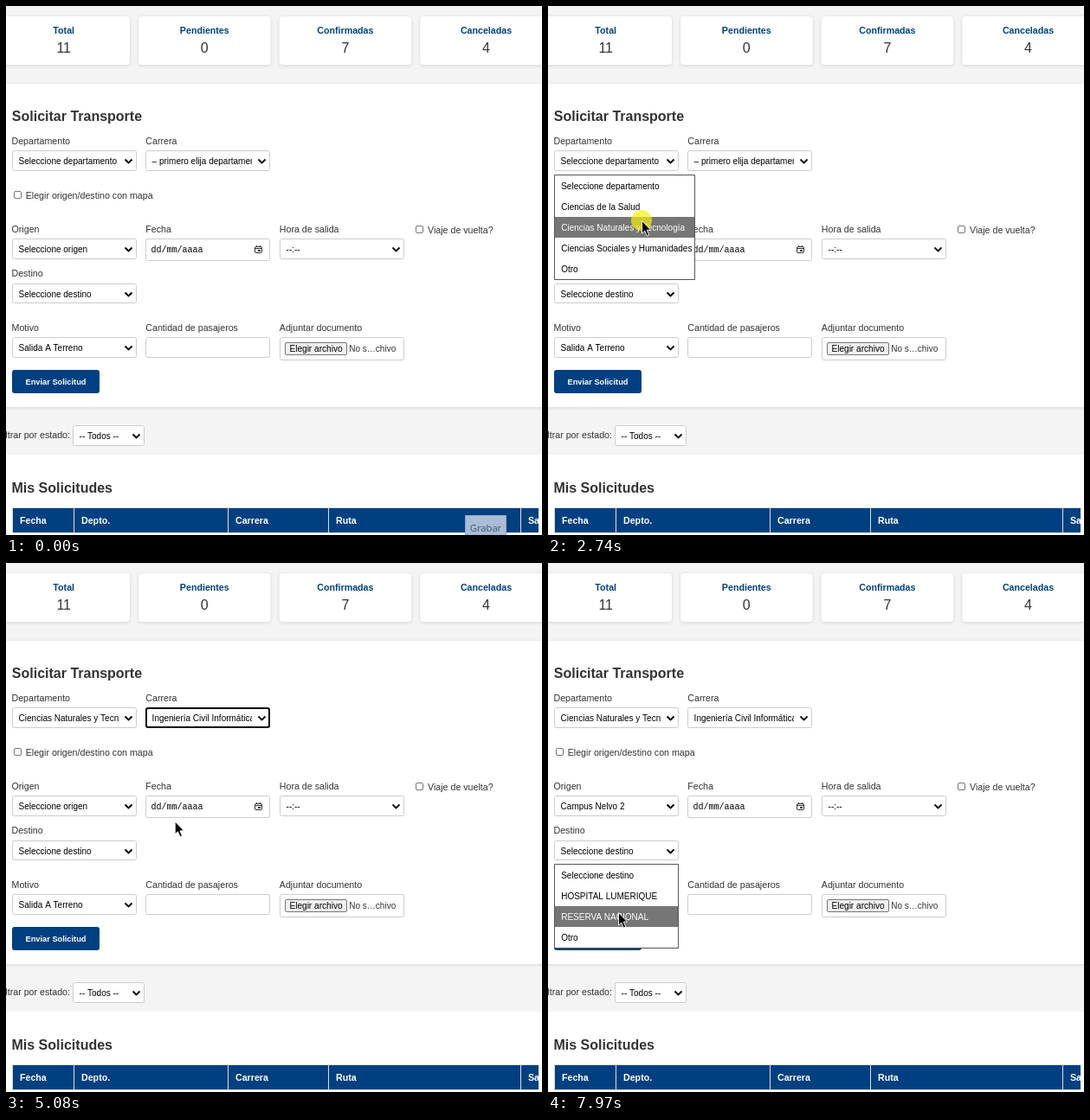
Recreate the animation shown at these times as an HTML page with a canvas. Size 619x612 px, loop 8000 ms.

```html
<!DOCTYPE html>
<html lang="es">
<head>
<meta charset="utf-8">
<title>Solicitar Transporte</title>
<style>
html, body { margin: 0; width: 100%; height: 100%; overflow: hidden; background: #fff; }
canvas { display: block; width: 619px; height: 612px; }
</style>
</head>
<body>
<canvas id="stage" width="619" height="612"></canvas>
<script>
const LOOP = 8000, ROW = 24;
const NAVY = '#004080', INK = '#333', PAGE = '#f4f4f4';
const ctx = document.getElementById('stage').getContext('2d');

// Pointer keys: time, x, y
const PATH = [
  [0, 505, 625], [30, 505, 625], [270, 454, 586], [510, 454, 586], [1130, 92, 225],
  [1320, 125, 194], [1350, 125, 194], [1480, 112, 180], [1830, 112, 180], [2460, 108, 248],
  [2830, 108, 248], [3380, 236, 178], [3580, 236, 178], [4280, 228, 306], [4770, 228, 306],
  [5570, 129, 284], [5970, 129, 284], [6450, 101, 334], [7320, 101, 334], [7970, 81, 404]
];

// press: pointer highlight starts; open/close: option list; pick: chosen option; blur: focus ring ends
const MENUS = [
  { x: 7, y: 167, h: 24, width: 163, press: 1730, open: 1790, choose: 2740, close: 2800, blur: 3420, pick: 2,
    options: ['Seleccione departamento', 'Ciencias de la Salud', 'Ciencias Naturales y Tecnología',
      'Ciencias Sociales y Humanidades', 'Otro'] },
  { x: 161, y: 167, h: 24, width: 144, press: 3420, open: 3480, choose: 4460, close: 4550, blur: 5600, pick: 4,
    options: ['Seleccione carrera', 'Agronomía', 'Ingeniería Forestal', 'Ingeniería Civil Industrial',
      'Ingeniería Civil Informática', 'Otro'],
    before: '– primero elija departamento –', ready: 2800 },
  { x: 7, y: 269, h: 24, width: 144, press: 5600, open: 5650, choose: 6610, close: 6680, blur: 7050, pick: 1,
    options: ['Seleccione origen', 'Campus Nelvo 2', 'LUMERIQUE', 'Otro'] },
  { x: 7, y: 321, h: 23, width: 144, press: 7050, open: 7075, choose: LOOP, close: LOOP, blur: LOOP, pick: 2,
    options: ['Seleccione destino', 'HOSPITAL LUMERIQUE', 'RESERVA NACIONAL', 'Otro'] }
];

const within = (t, from, to) => t >= from && t < to;

function pointerAt(t) {
  const next = PATH.findIndex(key => key[0] > t);
  if (next < 0) return PATH[PATH.length - 1].slice(1);
  const [t0, x0, y0] = PATH[next - 1], [t1, x1, y1] = PATH[next];
  const u = (t - t0) / (t1 - t0), k = u * u * (3 - 2 * u);
  return [x0 + (x1 - x0) * k, y0 + (y1 - y0) * k];
}

function rect(x, y, w, h, color) {
  ctx.fillStyle = color;
  ctx.fillRect(x, y, w, h);
}

function text(str, x, y, { size = 10.67, color = INK, bold = false, align = 'left', family = '"Liberation Sans", Arial, sans-serif' } = {}) {
  ctx.font = `${bold ? 'bold ' : ''}${size}px ${family}`;
  ctx.fillStyle = color;
  ctx.textAlign = align;
  ctx.fillText(str, x, y);
}

function frame(x, y, w, h, { border = '#ccc', fill = '#fff', radius = 2, line = 1 } = {}) {
  ctx.beginPath();
  ctx.roundRect(x + line / 2, y + line / 2, w - line, h - line, radius);
  ctx.fillStyle = fill;
  ctx.fill();
  ctx.strokeStyle = border;
  ctx.lineWidth = line;
  ctx.stroke();
}

function polyline(points, color, width) {
  ctx.beginPath();
  points.forEach(([x, y]) => ctx.lineTo(x, y));
  ctx.strokeStyle = color;
  ctx.lineWidth = width;
  ctx.stroke();
}

function select(label, x, y, w = 144, h = 24, focused = false) {
  frame(x, y, w, h, focused ? { border: '#000', line: 2 } : {});
  ctx.save();
  ctx.beginPath();
  ctx.rect(x, y, w - 21, h);
  ctx.clip();
  text(label, x + 7.6, y + 16, { size: 10, color: '#000' });
  ctx.restore();
  const cx = x + w - 9.5, cy = y + 10.5;
  polyline([[cx - 4, cy], [cx, cy + 4], [cx + 4, cy]], '#000', 1.8);
}

function checkbox(x, y) {
  frame(x, y, 9, 9, { border: '#767676', radius: 1.5 });
}

function shadowed(draw) {
  ctx.save();
  ctx.shadowColor = 'rgba(0,0,0,.13)';
  ctx.shadowBlur = 4;
  ctx.shadowOffsetY = 1;
  draw();
  ctx.restore();
}

function drawSummary() {
  const cards = [['Total', '11'], ['Pendientes', '0'], ['Confirmadas', '7'], ['Canceladas', '4']];
  cards.forEach(([title, count], i) => {
    const x = -9.5 + 162.6 * i;
    shadowed(() => {
      ctx.beginPath();
      ctx.roundRect(x, 12, 152.5, 56, 4);
      ctx.fillStyle = '#fff';
      ctx.fill();
    });
    text(title, x + 76.2, 32, { bold: true, color: NAVY, align: 'center' });
    text(count, x + 76.2, 54, { size: 16, align: 'center' });
  });
}

function drawCalendar(x, y) {
  frame(x, y + 1, 9, 8, { border: INK, radius: 1.5 });
  rect(x + 1, y + 3, 7, 1, INK);
  rect(x + 2, y, 1, 2, INK);
  rect(x + 6, y, 1, 2, INK);
  rect(x + 4, y + 5, 3, 2, INK);
}

function drawForm(t) {
  text('Solicitar Transporte', 6.8, 133, { size: 16, bold: true });
  [['Departamento', 6.5, 160], ['Carrera', 161.3, 160], ['Elegir origen/destino con mapa', 22.7, 223],
   ['Origen', 6.5, 262], ['Fecha', 161.3, 262], ['Hora de salida', 315.8, 262], ['Viaje de vuelta?', 487, 263],
   ['Destino', 6.5, 313], ['Motivo', 6.5, 376], ['Cantidad de pasajeros', 161.3, 376],
   ['Adjuntar documento', 315.8, 376]].forEach(([label, x, y]) => text(label, x, y));

  for (const m of MENUS) {
    const chosen = t >= m.close ? m.options[m.pick] : m.options[0];
    const label = m.before && t < m.ready ? m.before : chosen;
    select(label, m.x, m.y, 144, m.h, within(t, m.close, m.blur));
  }
  checkbox(9, 214);
  checkbox(473, 254);

  frame(161, 269, 144, 26);
  text('dd/mm/aaaa', 167.5, 285, { size: 10, color: '#000', family: '"Liberation Mono", monospace' });
  drawCalendar(287, 277);
  select('--:--', 316, 269);
  select('Salida A Terreno', 7, 383);
  frame(161, 383, 144, 24);

  frame(316, 383, 144, 27);
  frame(322, 389, 72, 15, { border: '#767676', fill: '#efefef', radius: 1.5 });
  text('Elegir archivo', 358, 400, { size: 10.1, color: '#000', align: 'center' });
  text('No s…chivo', 396.3, 400, { size: 10 });

  frame(7, 421, 101, 27, { border: NAVY, fill: NAVY });
  text('Enviar Solicitud', 57.5, 438, { size: 9.25, bold: true, color: '#fff', align: 'center' });
}

function drawTable() {
  text('Mis Solicitudes', 6.5, 563, { size: 16, bold: true });
  rect(7, 580, 608, 30, '#ddd');
  const columns = [['Fecha', 8, 78], ['Depto.', 79, 256], ['Carrera', 257, 372], ['Ruta', 373, 594], ['Salida', 595, 615]];
  for (const [title, left, right] of columns) {
    ctx.save();
    ctx.beginPath();
    ctx.rect(left, 581, right - left, 28);
    ctx.clip();
    rect(left, 581, right - left, 28, NAVY);
    text(title, left + 8, 599, { bold: true, color: '#fff' });
    ctx.restore();
  }
}

function drawTooltip(t) {
  ctx.globalAlpha = Math.max(0, Math.min(1, (200 - t) / 170));
  frame(530, 589, 48, 24, { border: '#8fa5c3', fill: '#a9bdd7', radius: 0 });
  text('Grabar', 554, 608, { size: 11.2, color: '#46536a', align: 'center', family: '"Open Sans", sans-serif' });
  ctx.globalAlpha = 1;
}

function drawMenu(m, pointerY) {
  const top = m.y + m.h + 4, count = m.options.length;
  frame(m.x, top, m.width, count * ROW + 2, { border: '#555', radius: 0 });
  const hovered = Math.max(0, Math.min(count - 1, Math.floor((pointerY - top - 1) / ROW)));
  m.options.forEach((option, i) => {
    const y = top + 1 + i * ROW;
    if (i === hovered) rect(m.x + 1, y, m.width - 2, ROW, '#767676');
    text(option, m.x + 8.2, y + 16, { size: 10, color: i === hovered ? '#fff' : '#000' });
  });
}

function drawPointer(x, y, pressed) {
  if (pressed) {
    ctx.beginPath();
    ctx.arc(x, y, 12, 0, 2 * Math.PI);
    ctx.fillStyle = 'rgba(245,238,20,.7)';
    ctx.fill();
  }
  ctx.save();
  ctx.translate(x + 0.5, y + 0.5);
  ctx.beginPath();
  [[0, 0], [0, 14.5], [3.2, 11.6], [5.8, 17.6], [8.2, 16.5], [5.7, 10.8], [10, 10.5]]
    .forEach(([px, py]) => ctx.lineTo(px, py));
  ctx.closePath();
  ctx.fillStyle = '#000';
  ctx.fill();
  ctx.strokeStyle = '#fff';
  ctx.lineWidth = 0.9;
  ctx.stroke();
  ctx.restore();
}

function render(t) {
  rect(0, 0, 619, 612, PAGE);
  drawSummary();
  shadowed(() => rect(-5, 90, 629, 374, '#fff'));
  drawForm(t);
  text('Filtrar por estado:', 74, 500, { align: 'right' });
  select('-- Todos --', 77, 485, 83);
  rect(0, 519, 619, 93, '#fff');
  drawTable();
  drawTooltip(t);

  const [x, y] = pointerAt(t);
  const openMenu = MENUS.find(m => within(t, m.open, m.close));
  if (openMenu) drawMenu(openMenu, y);
  drawPointer(x, y, MENUS.some(m => within(t, m.press, m.open) || within(t, m.choose, m.close)));
}

const start = performance.now();
function tick() {
  render((performance.now() - start) % LOOP);
  requestAnimationFrame(tick);
}
tick();
</script>
</body>
</html>
```
